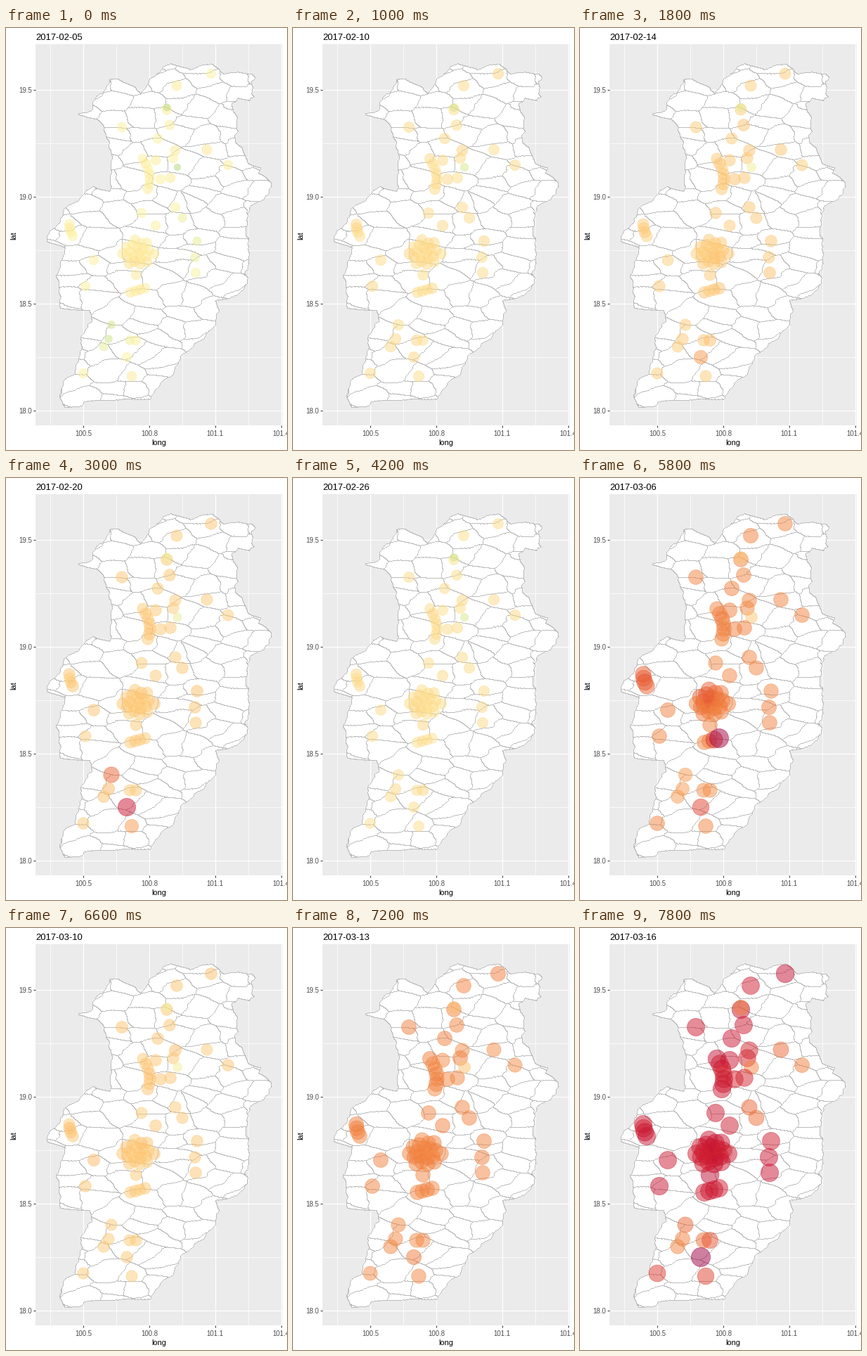
Write a matplotlib script that moves like this. It is 400 px wide and 600 px high and loops after 8000 ms.

```python
import numpy as np
import matplotlib.pyplot as plt
from matplotlib.animation import FuncAnimation
from matplotlib.colors import LinearSegmentedColormap
from matplotlib.patches import Rectangle
from matplotlib.path import Path

W, H, PX = 400, 600, 0.72          # stage size, points per pixel
DAYS, STEP = 40, 200
LEFT, RIGHT, TOP, BOTTOM = 42, 393.5, 23, 565

plt.rcParams["font.family"] = "Liberation Sans"
rng = np.random.default_rng(7)

fig = plt.figure(figsize=(W / 100, H / 100), dpi=100, facecolor="white")
ax = fig.add_axes([0, 0, 1, 1])
ax.set_xlim(0, W)
ax.set_ylim(H, 0)
ax.axis("off")


# ---- panel, grid and axes ----
def lon_x(lon):
    return 110 + (lon - 100.5) * 312.8


def lat_y(lat):
    return 88 + (19.5 - lat) * 304


def line(xs, ys, color, px, z):
    ax.plot(xs, ys, color=color, lw=px * PX, zorder=z, solid_capstyle="butt")


def label(x, y, text, size, color="black", **kw):
    return ax.text(x, y, text, fontsize=size * PX, color=color, **kw)


ax.add_patch(Rectangle((LEFT, TOP), RIGHT - LEFT, BOTTOM - TOP,
                       fc="#ebebeb", lw=0, zorder=0))
for k in range(8):
    major = k % 2 == 1
    weight = 1.2 if major else 0.7
    lon, lat = 100.35 + 0.15 * k, 19.75 - 0.25 * k
    x, y = lon_x(lon), lat_y(lat)
    line([x, x], [TOP, BOTTOM], "white", weight, 1)
    if k:
        line([LEFT, RIGHT], [y, y], "white", weight, 1)
    if major:
        line([x, x], [BOTTOM, BOTTOM + 3], "#333333", 1, 2)
        line([LEFT - 3, LEFT], [y, y], "#333333", 1, 2)
        label(x, 579.5, f"{lon:.1f}", 9.6, "#4d4d4d", ha="center")
        label(37, y + 3.5, f"{lat:.1f}", 9.6, "#4d4d4d", ha="right")
label(218, 593, "long", 11, ha="center")
label(11, 295, "lat", 11, ha="center", va="center", rotation=90)
title = label(42, 17, "", 13)

# ---- map: a province cut into wide, jagged cells ----
east = [
    (235, 48), (262, 57), (294, 53), (310, 67), (327, 64), (351, 66),
    (356, 72), (348, 90), (352, 97), (344, 102), (333, 99), (322, 110),
    (330, 146), (326, 156), (344, 190), (362, 197), (361, 207), (378, 226),
    (376, 234), (346, 258), (347, 268), (343, 278), (340, 297), (349, 333),
    (341, 350), (344, 357), (327, 380), (301, 390), (294, 429), (270, 446),
    (243, 474), (238, 492), (213, 513), (207, 525), (181, 529), (109, 531),
    (85, 540),
]
west = [
    (76, 516), (82, 500), (95, 490), (98, 478), (107, 461), (110, 435),
    (122, 420), (118, 399), (80, 398), (74, 386), (75, 350), (83, 314),
    (60, 304), (60, 292), (82, 272), (80, 256), (109, 240), (124, 225),
    (147, 233), (151, 208), (145, 152), (128, 129), (105, 123), (124, 113),
    (131, 97), (141, 95), (148, 73), (160, 72), (193, 91), (207, 73),
    (226, 53),
]
yy, xx = np.mgrid[0:H, 0:W] + 0.5


def wobble():
    """Smooth field that bends straight edges into rough ones."""
    total = np.zeros_like(xx)
    for wave in (45, 21, 10, 5):
        angle, phase = rng.uniform(0, 2 * np.pi, 2)
        along = xx * np.cos(angle) + yy * np.sin(angle)
        total += 0.05 * wave * np.sin(2 * np.pi * along / wave + phase)
    return total


wx, wy = xx + wobble(), yy + wobble()
inside = Path(east + west).contains_points(
    np.column_stack([wx.ravel(), wy.ravel()])).reshape(H, W)

best = np.full((H, W), np.inf)
cell = np.zeros((H, W), int)
centres = [(x, y) for y in range(45, 550, 21) for x in range(50, 390, 46)]
for n, (x, y) in enumerate(centres):
    x += rng.uniform(-22, 22)
    y += rng.uniform(-9, 9)
    d = np.hypot((wx - x) * 0.55, wy - y)
    near = d < best
    best[near], cell[near] = d[near], n
cell[~inside] = -1

edge = (cell != np.roll(cell, 1, 0)) | (cell != np.roll(cell, 1, 1))
land = np.ones((H, W, 4))
land[..., 3] = inside | edge
land[edge, :3] = 0.74
ax.imshow(land, extent=(0, W, H, 0), aspect="auto", interpolation="nearest",
          zorder=3)

# ---- stations: lone ones, then strands and a dense middle ----
lone = [
    (292, 65), (243, 82), (229, 116), (229, 113), (165, 141), (233, 138),
    (216, 157), (286, 173), (316, 195), (241, 174), (238, 185), (213, 188),
    (244, 198), (220, 215), (234, 213), (193, 263), (213, 281), (241, 255),
    (251, 270), (272, 303), (269, 326), (270, 348), (125, 330), (113, 367),
    (211, 321), (185, 351), (150, 422), (146, 442), (139, 453), (176, 444),
    (185, 444), (172, 468), (110, 491), (179, 495),
]
t = np.linspace(0, 1, 7)
north_strand = np.column_stack([195 + 10 * np.sin(2.4 * t), 186 + 43 * t])
west_strand = np.column_stack([90 + 5 * t[::2] ** 2, 279 + 17 * t[::2]])
low_strand = np.column_stack([177 + 21 * t[::2], 376 - 6 * t[::2]])
n = np.arange(19)
turn, reach = n * 2.4, np.sqrt((n + 0.5) / 19)
middle = np.column_stack([186 + 21 * reach * np.cos(turn),
                          320 + 21 * reach * np.sin(turn)])
spots = np.vstack([lone, north_strand, west_strand, low_strand, middle])

# ---- readings: a province-wide level plus local flare-ups ----
days = np.arange(DAYS)
keys = [0, 9, 15, 21, 29, 33, 39]
trend = np.interp(days, keys, [3.2, 4.6, 4.6, 3.9, 6.8, 4.65, 8.9])
flares = [                          # day, x, y, reach, boost
    (0, 145, 435, 25, -1.6), (0, 262, 300, 50, -0.8), (0, 190, 330, 40, 0.5),
    (9, 172, 468, 12, 1.3),
    (15, 172, 468, 12, 4.4), (15, 150, 422, 12, 3.3), (15, 179, 495, 12, 1.6),
    (29, 198, 370, 9, 3.2), (29, 178, 307, 22, 0.9), (29, 92, 287, 20, 1),
    (29, 140, 440, 35, -1), (29, 172, 468, 12, 1.6),
    (39, 305, 190, 45, -2.2), (39, 140, 450, 50, -2.2),
    (39, 172, 468, 12, 2.7), (39, 246, 263, 15, -2),
]
daily = np.tile(trend[:, None], len(spots))
for day, x, y, size, boost in flares:
    when = np.exp(-((days - day) / 2) ** 2)
    where = np.exp(-((spots - (x, y)) ** 2).sum(axis=1) / size ** 2)
    daily += boost * np.outer(when, where)
for clean in ((244, 198), (229, 113)):
    daily[:, (spots == clean).all(axis=1)] -= 2
daily += rng.normal(0, 0.12, daily.shape)
daily = daily.clip(1, 10)

heat = LinearSegmentedColormap.from_list("heat", [
    "#b4d77a", "#d6e88a", "#fdf39c", "#fdd985", "#fdbc69",
    "#f99a4e", "#f07d3c", "#e5502f", "#cb1532", "#9e0142"])
dots = ax.scatter([], [], zorder=5)
dots.set_linewidth(0.8 * PX)


def draw(i):
    day = 5 + i
    month, day = (2, day) if day <= 28 else (3, day - 28)
    title.set_text(f"2017-{month:02d}-{day:02d}")
    level = daily[i]
    colors = heat((level - 1) / 9)
    colors[:, 3] = 0.5
    dots.set_offsets(spots)
    dots.set_sizes((2 * (level + 3.6) * PX) ** 2)
    dots.set_facecolors(colors)
    dots.set_edgecolors(colors)
    return dots, title


anim = FuncAnimation(fig, draw, frames=DAYS, interval=STEP, repeat=True,
                     repeat_delay=0, init_func=lambda: draw(0))
plt.show()
```
